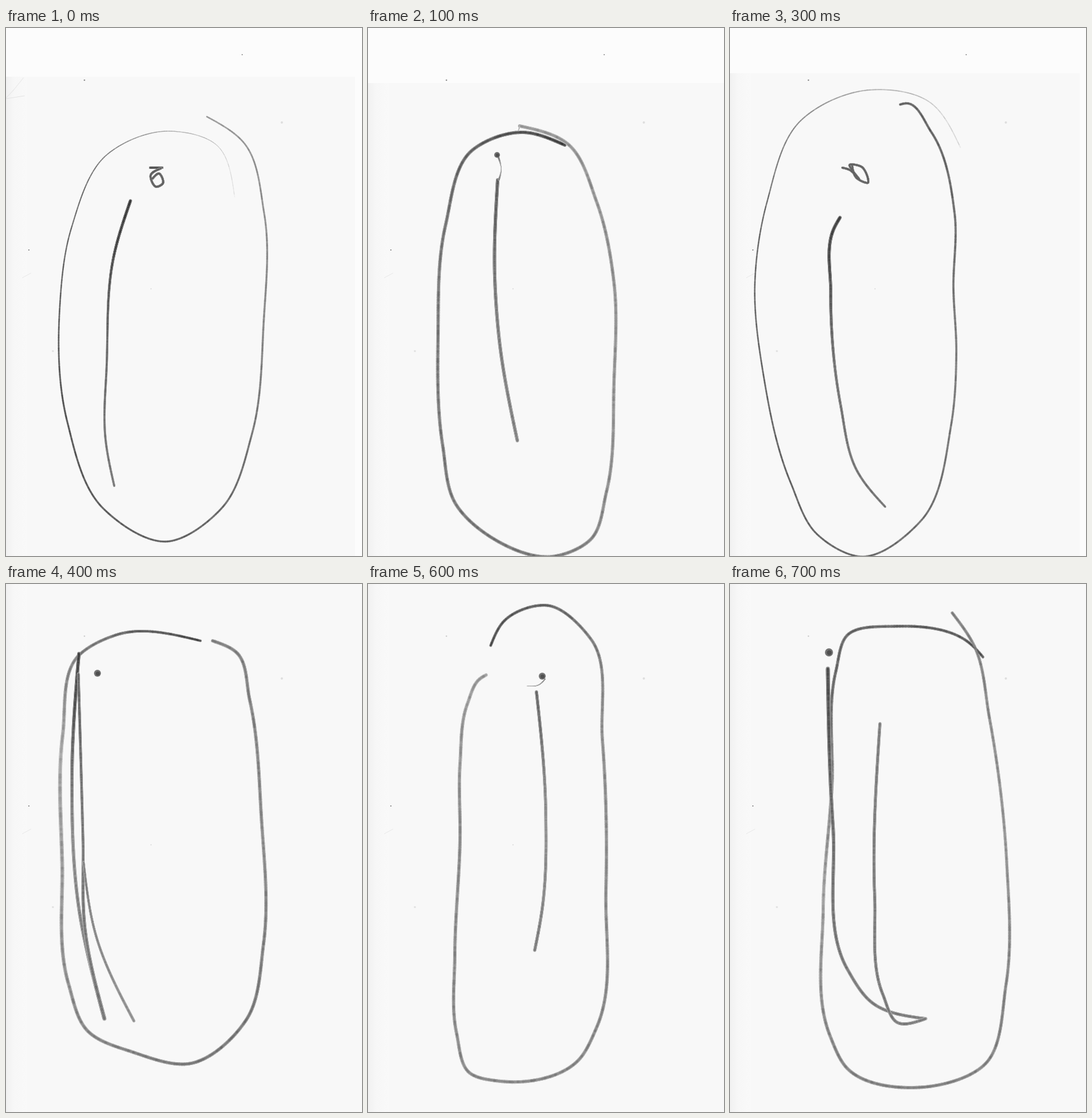
An HTML page with a canvas for the animation above (0.8 s loop, 615 px wide and 911 px high).

```html
<!DOCTYPE html>
<html lang="en">
<head>
<meta charset="utf-8">
<title>Pen loops</title>
<style>
html, body { margin: 0; height: 100%; overflow: hidden; background: #f8f8f8; }
canvas { display: block; }
</style>
</head>
<body>
<canvas id="stage" width="615" height="911"></canvas>
<script>
const W = 615, H = 911, STEP = 100, N = 420;
const ctx = document.getElementById('stage').getContext('2d');
const lerp = (a, b, t) => a + (b - a) * t;
const mix = (p, q, t) => p.map((v, i) => lerp(v, q[i], t));
const noise = i => { const v = Math.sin(i * 12.9898) * 43758.5453; return v - Math.floor(v); };
const gray = v => `rgb(${v},${v},${v})`;

// Value of an evenly spaced ramp at t in 0..1
function ramp(list, t) {
  const p = t * (list.length - 1), i = Math.floor(p);
  return i < list.length - 1 ? lerp(list[i], list[i + 1], p - i) : list[i];
}

// Chord-length spline through a few x,y pairs, sampled as [x, y, width, grey]
function stroke(xy, widths, greys) {
  const pts = [], knots = [0];
  for (let i = 0; i < xy.length; i += 2) pts.push([xy[i], xy[i + 1]]);
  const end = pts.length - 1;
  for (let i = 0; i < end; i++) {
    knots.push(knots[i] + Math.hypot(pts[i + 1][0] - pts[i][0], pts[i + 1][1] - pts[i][1]));
  }
  const chord = i => pts[i].map((v, k) => (pts[i + 1][k] - v) / (knots[i + 1] - knots[i]));
  const slopes = pts.map((_, i) => i === 0 || i === end ? null :
    mix(chord(i - 1), chord(i), (knots[i] - knots[i - 1]) / (knots[i + 1] - knots[i - 1])));
  slopes[0] = end > 1 ? mix(slopes[1], chord(0), 1.5) : chord(0);
  slopes[end] = end > 1 ? mix(slopes[end - 1], chord(end - 1), 1.5) : chord(0);

  return Array.from({ length: N + 1 }, (_, n) => {
    const t = n / N, d = t * knots[end];
    let i = 0;
    while (i < end - 1 && knots[i + 1] < d) i++;
    const h = knots[i + 1] - knots[i], u = (d - knots[i]) / h, r = 1 - u;
    const [x, y] = [0, 1].map(k =>
      r * r * ((1 + 2 * u) * pts[i][k] + u * h * slopes[i][k]) +
      u * u * ((3 - 2 * u) * pts[i + 1][k] - r * h * slopes[i + 1][k]));
    return [x, y, ramp(widths, t), ramp(greys, t)];
  });
}

// Each drawing: paper edge, optional dot [x, y, r], strokes (outline, inner line, details)
const first = {
  top: 84, right: 603, fold: true,
  strokes: [
    stroke([395,292, 365,203, 280,178, 175,218, 113,345, 93,480, 106,680, 168,829, 278,886, 373,828,
      425,700, 445,510, 446,320, 410,197, 347,153], [1, 2.2, 3.4, 3.6, 3.8, 2.8], [225, 105, 80, 100, 130, 150]),
    stroke([215,298, 187,390, 174,580, 172,710, 187,790], [5.5, 4, 4], [60, 105, 120]),
    stroke([249,241, 270,241], [4], [95]),
    stroke([268,242, 250,254, 260,274, 271,268, 264,251, 253,260], [4], [100])
  ]
};

const second = {
  top: 95, right: W, dot: [223, 219, 5],
  strokes: [
    stroke([340,202, 265,180, 180,211, 134,340, 121,530, 129,720, 152,822, 210,877, 325,911, 385,882,
      412,800, 425,610, 425,440, 395,300, 345,200, 262,169], [6], [65, 120, 120, 115, 145, 140, 150]),
    stroke([224,262, 219,430, 227,540, 258,712], [6], [95, 125, 130]),
    stroke([225,222, 230,245, 226,262], [3, 1, 3], [120, 190, 130]),
    stroke([262,169, 260,177], [1], [185])
  ]
};

const third = {
  top: 78, right: 604,
  strokes: [
    stroke([398,206, 345,128, 240,107, 122,160, 64,300, 43,440, 58,600, 105,785, 150,873, 225,912,
      330,850, 382,685, 391,560, 386,450, 388,320, 348,180, 303,130, 294,132],
      [1.8, 2.6, 3.4, 4, 4.5], [220, 100, 95, 120, 95]),
    stroke([190,327, 180,345, 174,455, 191,650, 220,765, 268,826], [6, 5, 4], [65, 115, 115]),
    stroke([194,241, 207,245, 223,261, 207,236, 228,240, 238,267, 218,258, 211,238], [4], [100])
  ]
};

const fourth = {
  top: 0, right: W, dot: [158, 154, 6],
  strokes: [
    stroke([336,98, 190,88, 125,124, 98,260, 97,480, 108,690, 140,770, 220,808, 320,827, 415,752,
      445,620, 441,400, 421,200, 398,118, 357,98], [4.5, 7, 6, 6, 6], [70, 165, 140, 115, 135, 125]),
    stroke([126,120, 114,330, 126,560, 170,750], [6], [65, 140, 120]),
    stroke([125,155, 133,440, 137,600, 170,750], [5, 5, 7], [105, 120, 120]),
    stroke([134,480, 155,605, 221,754], [4, 5], [130, 145])
  ]
};

const fifth = {
  top: 0, right: W, dot: [301, 159, 6],
  strokes: [
    stroke([204,157, 194,163, 172,206, 159,310, 159,440, 150,640, 153,775, 175,843, 230,858, 365,820,
      395,765, 411,530, 405,270, 385,95, 310,37, 235,64, 212,106], [6, 6, 6, 6, 5],
      [150, 140, 135, 130, 140, 135, 75]),
    stroke([291,186, 307,390, 301,560, 288,632], [5.5], [105, 145, 125]),
    stroke([306,164, 295,174, 275,176], [1.5, 1], [140, 200])
  ]
};

const sixth = {
  top: 0, right: W, dot: [171, 118, 7],
  strokes: [
    stroke([437,126, 415,103, 285,73, 202,89, 183,150, 176,350, 161,560, 173,780, 200,833, 335,868,
      440,829, 477,690, 478,480, 448,230, 421,105, 384,50], [5, 6, 6, 5.5, 5.5],
      [85, 110, 155, 125, 130, 145, 125]),
    stroke([169,146, 178,420, 203,665, 245,722, 338,750], [7, 6, 5.5], [80, 115, 125]),
    stroke([338,750, 290,757, 264,708, 250,540, 259,241], [5.5], [125])
  ]
};

// In-between drawing: outline and inner line halfway from a to b
const between = (a, b) => ({
  top: (a.top + b.top) / 2, right: W,
  dot: mix(a.dot, b.dot || a.dot, 0.5),
  strokes: [0, 1].map(k => a.strokes[k].map((p, i) => mix(p, b.strokes[k][i], 0.5)))
});

const drawings = [first, second, between(second, third), third, fourth,
  between(fourth, fifth), fifth, sixth];

function dot(x, y, r, grey) {
  ctx.fillStyle = gray(grey);
  ctx.beginPath();
  ctx.arc(x, y, r, 0, 7);
  ctx.fill();
}

function line(grey, width, ...xy) {
  ctx.strokeStyle = gray(grey);
  ctx.lineWidth = width;
  ctx.beginPath();
  for (let i = 0; i < xy.length; i += 2) ctx.lineTo(xy[i], xy[i + 1]);
  ctx.stroke();
}

function paper({ top, right, fold }) {
  ctx.fillStyle = gray(248);
  ctx.fillRect(0, 0, W, H);
  const edge = ctx.createLinearGradient(0, 0, 36, 0);
  edge.addColorStop(0, gray(241));
  edge.addColorStop(0.4, gray(247));
  edge.addColorStop(1, gray(249));
  ctx.fillStyle = edge;
  ctx.fillRect(0, 0, 36, H);
  ctx.fillStyle = gray(252);
  ctx.fillRect(0, 0, W, top);
  ctx.fillRect(right, 0, W - right, H);
  if (top) dot(408, 46, 0.9, 120);
  if (fold) {
    line(233, 1.2, 0, 121, 14, 106, 30, 86);
    line(228, 1, 0, 122, 32, 117);
  }
  line(232, 1, 28, 431, 43, 423);
  dot(39.5, 383, 1, 110);
  dot(135.5, 90, 1.2, top ? 130 : 200);
  dot(476.5, 163, 2, 222);
  dot(81, 557.5, 1.8, 226);
  dot(250.5, 450, 1, 215);
}

// Soft pale rim first, then a grainy core
function ink(points) {
  for (const [scale, fade] of [[1, 0.4], [0.6, 0]]) {
    for (let i = 0; i < points.length - 1; i++) {
      const [x, y, w, g] = points[i], [nx, ny] = points[i + 1];
      const grain = (noise(i + 1) - 0.5) * 24;
      line(Math.round(lerp(g + grain, 248, fade)), w * scale, x, y, nx, ny);
    }
  }
}

function draw(index) {
  const d = drawings[index];
  ctx.lineCap = ctx.lineJoin = 'round';
  paper(d);
  d.strokes.forEach(ink);
  if (d.dot) {
    const [x, y, r] = d.dot;
    dot(x, y, r, 115);
    dot(x + 0.5, y + 0.5, r * 0.6, 80);
  }
}

let shown = -1;
function tick(now) {
  const index = Math.floor(now / STEP) % drawings.length;
  if (index !== shown) draw(shown = index);
  requestAnimationFrame(tick);
}
tick(0);
</script>
</body>
</html>
```
